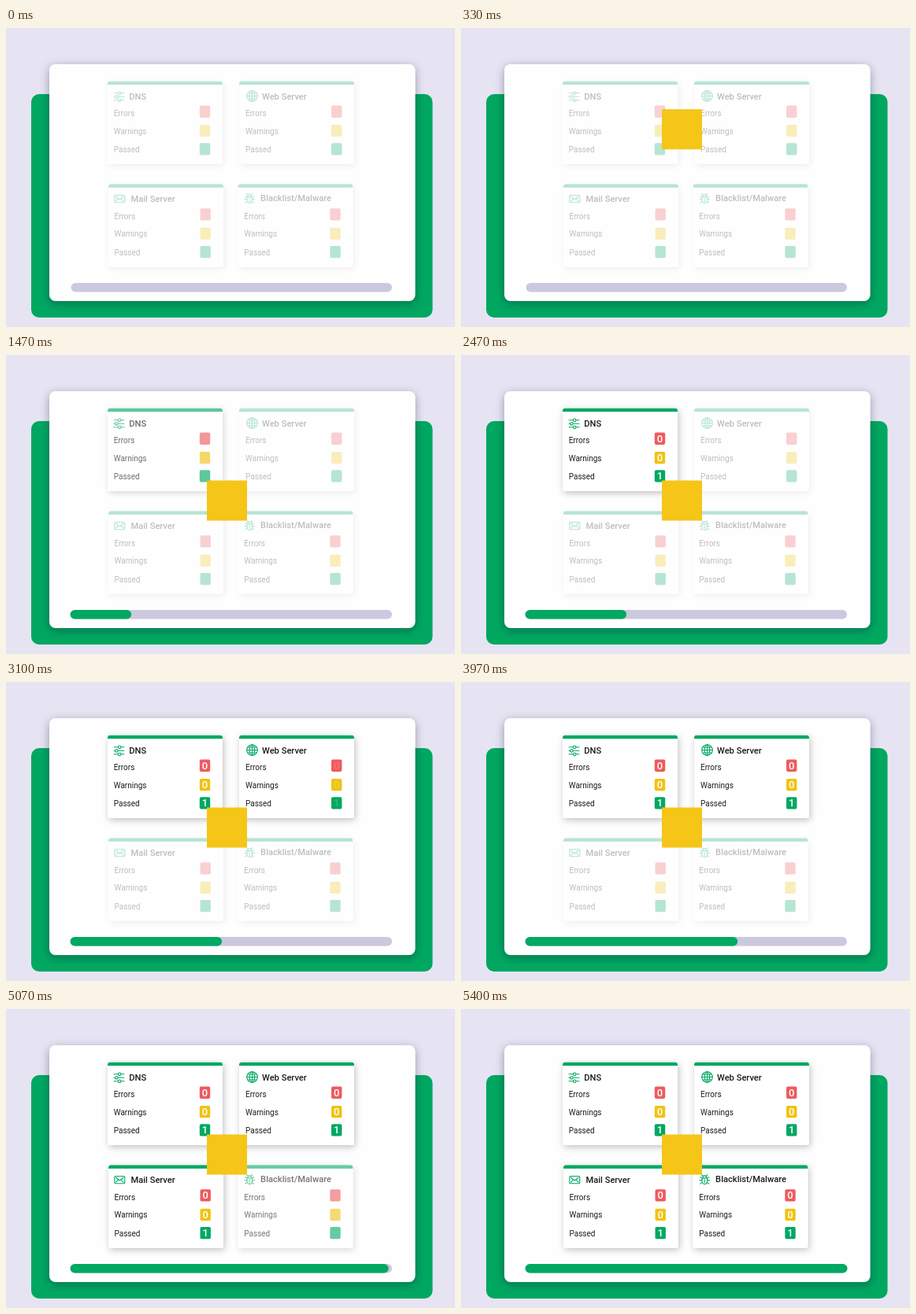
Animation of 570x380 px, one loop 8.73 s. Source, as an HTML page:

```html
<!DOCTYPE html>
<html lang="en">
<head>
<meta charset="utf-8">
<title>Server health check</title>
<style>
html, body { margin: 0; width: 100%; height: 100%; overflow: hidden; background: #e6e4f2; }
svg { display: block; width: 100%; height: 100%; }
text { font-family: Roboto, sans-serif; fill: #1c1c1e; }
.title { font-size: 11.15px; font-weight: 500; }
.row { font-size: 10px; }
.digit { font-size: 13px; font-weight: 500; fill: #fff; text-anchor: middle; }
.icon { fill: none; stroke: #00a862; stroke-width: 1.1; stroke-linecap: round; stroke-linejoin: round; }
</style>
</head>
<body>
<svg viewBox="0 0 570 380" xmlns="http://www.w3.org/2000/svg">
  <defs>
    <filter id="panelShadow" x="-10%" y="-10%" width="120%" height="125%">
      <feDropShadow dx="0" dy="3" stdDeviation="6" flood-color="#1a2030" flood-opacity=".36"/>
    </filter>
    <filter id="cardShadow" x="-20%" y="-20%" width="140%" height="145%">
      <feDropShadow dx="1.5" dy="2.5" stdDeviation="4.5" flood-color="#000" flood-opacity=".24"/>
    </filter>
    <clipPath id="cardClip"><rect width="146" height="105.5" rx="3.5"/></clipPath>
  </defs>
  <rect width="570" height="380" fill="#e6e4f2"/>
  <rect x="32" y="84" width="509.5" height="284" rx="10" fill="#00a761"/>
  <rect x="55" y="46" width="464.5" height="301" rx="8" fill="#fefefe" filter="url(#panelShadow)"/>
  <g id="cards"></g>
  <rect x="82.5" y="324" width="407.5" height="11.5" rx="5.75" fill="#cbc9e0"/>
  <rect id="fill" x="81.5" y="324" height="11.5" rx="5.75" fill="#00a862"/>
  <rect id="badge" x="255" y="159.5" width="51" height="51" fill="#f5c518"/>
</svg>
<script>
const LOOP = 8730;
const FAINT = 0.28;
const $ = id => document.getElementById(id);
const clamp = v => Math.min(1, Math.max(0, v));
const ramp = (t, [a, b]) => clamp((t - a) / (b - a));
const easeOut = p => 1 - (1 - p) ** 3;

const icons = {
  sliders: `<path d="M0 2.7H5.4M9 2.7H13M0 7.2H1.6M5.2 7.2H13M0 11.7H5.4M9 11.7H13"/>
    <circle cx="7.2" cy="2.7" r="1.8"/><circle cx="3.4" cy="7.2" r="1.8"/><circle cx="7.2" cy="11.7" r="1.8"/>`,
  globe: `<circle cx="7" cy="7" r="6.8"/><ellipse cx="7" cy="7" rx="3.2" ry="6.8"/>
    <path d="M.2 7H13.8M7 .2V13.8M1.4 3.5H12.6M1.4 10.5H12.6"/>`,
  mail: `<rect x=".5" y="2.5" width="13" height="9.2" rx="1"/>
    <path d="M2.2 4.2L7 8L11.8 4.2M2.2 10L4.7 7.7M11.8 10L9.3 7.7"/>`,
  bug: `<path d="M3.3 5.5H9.7V9.5A3.2 3.6 0 0 1 3.3 9.5ZM4 5.3A2.5 2.8 0 0 1 9 5.3M4.3 2.8L2.9 1.2M8.7 2.8L10.1 1.2
    M.3 8.2H3.3M9.7 8.2H12.7M3.3 6.2L1 4.3M9.7 6.2L12 4.3M3.5 10.7L1 12.8M9.5 10.7L12 12.8M6.5 7.3V11"/>`
};

// x, y: card corner; other positions are relative to it
const cards = [
  { x: 129, y: 67.5, title: "DNS", tx: 27.3, ty: 23.6, icon: "sliders", ix: 8, iy: 12.6,
    rx: 7.7, box: 116.8, show: [1370, 1580], count: [1590, 1900] },
  { x: 296, y: 67.5, title: "Web Server", tx: 29, ty: 23.6, icon: "globe", ix: 9.5, iy: 12,
    rx: 8, box: 117, show: [2920, 3090], count: [3080, 3200] },
  { x: 130, y: 198.2, title: "Mail Server", tx: 28.4, ty: 23, icon: "mail", ix: 7.3, iy: 11.8,
    rx: 7.5, box: 116.5, show: [4050, 4250], count: [4250, 4400] },
  { x: 294.5, y: 198.2, title: "Blacklist/Malware", tx: 28.6, ty: 22, icon: "bug", ix: 8.2, iy: 11.2,
    rx: 7.8, box: 116.8, show: [4980, 5190], count: [5190, 5400] }
];
const rows = [
  { name: "Errors", value: 0, color: "#ef5b5f", base: 44.4, top: 31.1 },
  { name: "Warnings", value: 0, color: "#f0c314", base: 67.2, top: 55.5 },
  { name: "Passed", value: 1, color: "#00a862", base: 90.7, top: 78.7 }
];

const cardMarkup = c => `<g class="card" transform="translate(${c.x} ${c.y})">
  <rect width="146" height="105.5" rx="3.5" fill="#fff" filter="url(#cardShadow)"/>
  <rect width="146" height="4.6" fill="#00a862" clip-path="url(#cardClip)"/>
  <g class="icon" transform="translate(${c.ix} ${c.iy})">${icons[c.icon]}</g>
  <text class="title" x="${c.tx}" y="${c.ty}">${c.title}</text>
  ${rows.map(r => `<text class="row" x="${c.rx}" y="${r.base}">${r.name}</text>
    <rect x="${c.box}" y="${r.top}" width="13.4" height="15.3" rx="1.8" fill="${r.color}"/>`).join("")}
  <g class="digits">${rows.map(r =>
    `<text class="digit" x="${c.box + 6.7}" y="${r.top + 12.2}">${r.value}</text>`).join("")}</g>
</g>`;
$("cards").innerHTML = cards.map(cardMarkup).join("");
document.querySelectorAll(".card").forEach((node, i) => {
  cards[i].node = node;
  cards[i].digits = node.querySelector(".digits");
});

// time, right end of the progress bar
const progress = [
  [670, 81.5], [870, 101], [1470, 159], [1630, 173.5], [2030, 173.5], [2470, 210],
  [2930, 257], [3200, 284], [3570, 284], [3970, 351], [4230, 390], [4500, 390], [5100, 490.5]
];
function barEnd(t) {
  const i = progress.findIndex(p => p[0] > t);
  if (i === 0) return progress[0][1];
  if (i < 0) return progress[progress.length - 1][1];
  const [t0, x0] = progress[i - 1], [t1, x1] = progress[i];
  return x0 + (x1 - x0) * ramp(t, [t0, t1]);
}

function draw(t) {
  for (const c of cards) {
    c.node.setAttribute("opacity", FAINT + (1 - FAINT) * ramp(t, c.show));
    c.digits.setAttribute("opacity", ramp(t, c.count));
  }
  $("fill").setAttribute("width", barEnd(t) - 81.5);
  const drop = easeOut(ramp(t, [140, 670]));
  $("badge").setAttribute("transform", `translate(0 ${-215 * (1 - drop)})`);
  $("badge").setAttribute("visibility", t < 170 ? "hidden" : "visible");
}

const start = performance.now();
function tick() {
  draw((performance.now() - start) % LOOP);
  requestAnimationFrame(tick);
}
tick();
</script>
</body>
</html>
```
